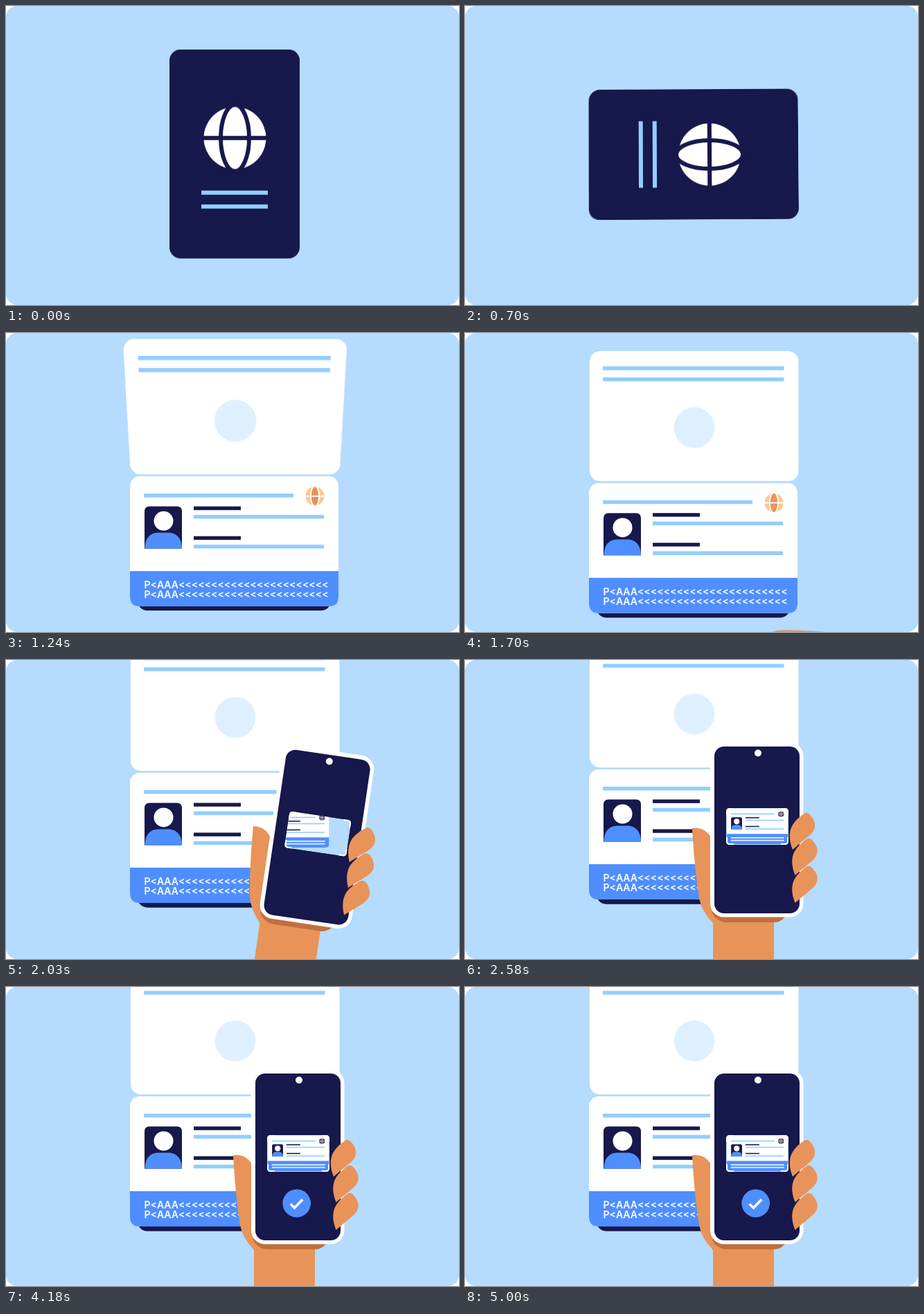
An HTML page for the animation above (5030 ms loop, 654 by 432 pixels).

```html
<!DOCTYPE html>
<html lang="en">
<head>
<meta charset="utf-8">
<title>Passport scan</title>
<style>
  html, body { margin: 0; width: 100%; height: 100%; overflow: hidden; background: #fff; }
  #stage { position: relative; width: 654px; height: 432px; overflow: hidden; border-radius: 16px; background: #b5dbff; }
  #booklet { position: absolute; left: 179px; top: 0; width: 302px; height: 188px; perspective: 970px; }
  #cover { position: absolute; inset: 0; transform-origin: 50% -1.25px; transform-style: preserve-3d; }
  svg { position: absolute; left: 0; top: 0; overflow: visible; }
  #cover svg { backface-visibility: hidden; }
  #inside { transform: rotateX(180deg); }
  text { font: 600 14px Inter, "Liberation Sans", sans-serif; fill: #fff; }
</style>
</head>
<body>
<div id="stage"></div>
<script>
const LOOP = 5030;
const NAVY = '#17184b', SKY = '#93ceff', BLUE = '#4f8eff', SKIN = '#e89359', BG = '#b5dbff';
const WRIST = '363 438';

const rect = (x, y, w, h, fill, r = 0) =>
  `<rect x="${x}" y="${y}" width="${w}" height="${h}" rx="${r}" fill="${fill}"/>`;
const disc = (x, y, r, fill) => `<circle cx="${x}" cy="${y}" r="${r}" fill="${fill}"/>`;
const path = (d, fill, extra = '') => `<path d="${d}" fill="${fill}" ${extra}/>`;
const svg = (id, w, h, body) => `<svg id="${id}" width="${w}" height="${h}">${body}</svg>`;

// Globe: disc, middle lens, and gaps in the background colour
function globe(x, y, r, side, lens, gap) {
  const w = r * 0.135;
  return `<g transform="translate(${x} ${y})">${disc(0, 0, r, side)}
    <ellipse rx="${r * 0.455}" ry="${r * 1.067}" fill="${lens}" stroke="${gap}" stroke-width="${w}"/>
    ${rect(-r - 1, -w / 2, 2 * r + 2, w, gap)}</g>`;
}

function page(height, stripTop, globeSide, globeLens, print) {
  return rect(0, 0, 301, height, '#fff', 14)
    + rect(20, 25, 216, 5.5, SKY)
    + globe(267, 28.7, 13.5, globeSide, globeLens, '#fff')
    + path('M21 104.5V51Q21 43.5 28 43.5H68Q75 43.5 75 51V104.5Z', NAVY)
    + disc(48.5, 64.5, 14, '#fff')
    + path('M21.5 104.5C21.5 90 29 81.500 40 81.500H56C67 81.500 75 90 75 104.500Z', BLUE)
    + [43.5, 86.5].map(y => rect(92, y, 68, 5.3, NAVY) + rect(92, y + 12.2, 188, 5.5, SKY)).join('')
    + path(`M0 ${stripTop}H301V${height - 14}Q301 ${height} 287 ${height}H14Q0 ${height} 0 ${height - 14}Z`, BLUE)
    + print;
}

const code = 'P&lt;AAA' + '&lt;'.repeat(23);
const fullPage = page(188, 137, '#ffc792', '#e8935a',
  [162, 176].map(y => `<text x="20.5" y="${y}">${code}</text>`).join(''));
const miniPage = page(176, 126, NAVY, '#6b5a70',
  [142, 155].map(y => rect(20, y, 262, 6, '#e6f0ff')).join(''));

const front = rect(0, 0, 302, 188, NAVY, 16)
  + `<g transform="translate(151 94) rotate(90)">${globe(0.5, -23, 45, '#fff', '#fff', NAVY)}
     ${rect(-48, 53, 96, 6, SKY)}${rect(-48, 73, 96, 6, SKY)}</g>`;
const inside = rect(1, 0, 301.5, 188, '#fff', 15)
  + rect(20, 22, 261.500, 5.6, SKY) + rect(20, 38, 261.500, 5.6, SKY)
  + disc(152, 110.5, 29.4, '#def0ff');

const finger = 'M491 221Q478 229 472 240Q465 254 473 274L499 252Q511 240 500 226Q496 220 491 221Z';
const brackets = 'M378 224V219Q378 215 382 215H388M456 215H462Q466 215 466 219V224'
  + 'M466 256V262Q466 266 462 266H456M388 266H382Q378 266 378 262V256';

const phone = `<clipPath id="view">${rect(377, 214, 90, 53, '#000', 5)}</clipPath><g id="hand">`
  + path('M328 243Q346 241 355 256L380 300H446V442H358V380Q341 362 338 344Q331 300 328 243Z', SKIN)
  + path('M356 364H470L458 375Q453 379 446 379H378Q368 379 360 371Z', '#c06f3e')
  + rect(354, 119, 134.500, 252.500, '#fff', 20)
  + rect(360, 125, 123, 241, NAVY, 14)
  + disc(423, 134.500, 5, '#fff')
  + `<g clip-path="url(#view)">${rect(377, 214, 90, 53, BG)}
     <g id="mini"><g transform="translate(378 214.400) scale(.293)">${miniPage}</g></g></g>`
  + path(brackets, 'none', 'stroke="#fff" stroke-width="2"')
  + `<g id="check">${disc(0, 0, 20.3, BLUE)}
     ${path('M-9 1L-3.200 6.500L8.500 -5.500', 'none', 'stroke="#fff" stroke-width="3.600"')}</g>`
  + [[0, 0], [3.5, 37], [3.5, 77]].map(([x, y]) => path(finger, SKIN, `transform="translate(${x} ${y})"`)).join('')
  + '</g>';

const $ = id => document.getElementById(id);
$('stage').innerHTML = `<div id="booklet">
  ${svg('page', 302, 188, `<g id="back">${rect(10.5, 100, 280, 88, NAVY, 15)}</g>` + fullPage)}
  <div id="cover">${svg('front', 302, 188, front)}${svg('inside', 302, 188, inside)}</div>
</div>` + svg('phone', 654, 432, phone);

// Cubic ease in and out between two times
function ease(t, from, to) {
  const k = Math.min(1, Math.max(0, (t - from) / (to - from)));
  return k < 0.5 ? 4 * k ** 3 : 1 - 4 * (1 - k) ** 3;
}

function draw(t) {
  const turn = ease(t, 0, 773);
  const open = ease(t, 590, 1530);
  const drop = ease(t, 600, 1550);
  const lift = ease(t, 1520, 2220);
  const y = 119.7 + 101.3 * drop - 63 * lift;
  const tilt = 107 * (1 - lift);

  $('booklet').style.transform = `translateY(${y}px) rotate(${90 * turn - 90}deg)`;
  $('cover').style.transform = `rotateX(${180 * open}deg)`;
  $('page').style.visibility = open > 0.001 ? 'visible' : 'hidden';
  $('back').setAttribute('transform', `translate(0 ${6.8 * open})`);

  $('phone').style.visibility = t > 1520 ? 'visible' : 'hidden';
  $('hand').setAttribute('transform', `rotate(${tilt} ${WRIST})`);
  $('mini').setAttribute('transform', `rotate(${-tilt} ${WRIST}) translate(0 ${y - 158})`);
  $('check').setAttribute('transform', `translate(419.700 312.500) scale(${ease(t, 2650, 2950)})`);
}

const start = performance.now();
function tick() {
  draw((performance.now() - start) % LOOP);
  requestAnimationFrame(tick);
}
tick();
</script>
</body>
</html>
```
